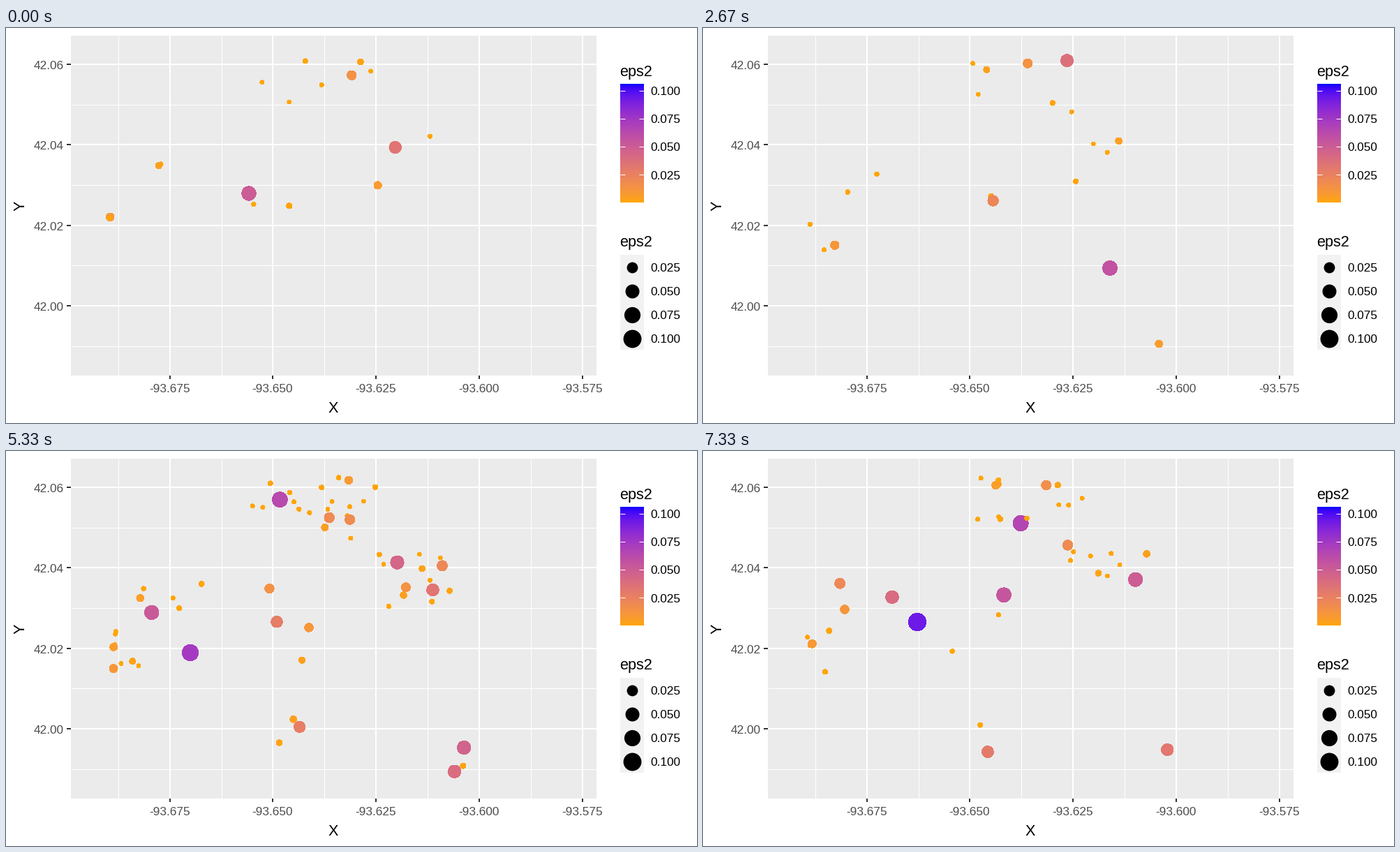
Animation of 990x566 px, one loop 8000 ms. Source, as a matplotlib script:

```python
import numpy as np
import matplotlib.pyplot as plt
from matplotlib.animation import FuncAnimation
from matplotlib.patches import Rectangle

W, H, DPI = 990, 566, 100
PX = 72 / DPI                      # one pixel in points
LOOP, TICK, SCENES = 8000, 40, 12
LEFT, RIGHT, TOP, BOTTOM = 92.5, 846, 10.5, 498
X0, DX, Y0, DY = 234.7, 147.75, 51.9, 115.4
EPS_MIN, EPS_MAX = 0.0004, 0.1059
R_MIN, R_SPAN = 2.94, 10.3

# Neighbourhoods: centre x, centre y, half width, half height, share of dots
AREAS = np.array([
    (163, 286, 27, 32, 13), (235, 208, 48, 28, 10), (415, 73, 62, 38, 24),
    (515, 85, 32, 50, 13), (582, 185, 62, 42, 22), (395, 255, 45, 60, 9),
    (405, 400, 20, 32, 3), (650, 444, 24, 19, 6),
])
# Key scenes: number of dots and place of the largest one
KEY = [0, 2, 4, 6, 8, 10, 11]
DOTS = [17, 27, 20, 39, 60, 90, 40]
LEAD_X = [348, 533, 583, 416, 264, 557, 307]
LEAD_Y = [237, 212, 344, 272, 289, 211, 245]

TO_XYZ = np.array([(0.4124, 0.3576, 0.1805), (0.2126, 0.7152, 0.0722),
                   (0.0193, 0.1192, 0.9505)])
WHITE = TO_XYZ.sum(axis=1)


def to_lab(rgb):
    rgb = np.array(rgb, float)
    lin = np.where(rgb > 0.04045, ((rgb + 0.055) / 1.055) ** 2.4, rgb / 12.92)
    v = TO_XYZ @ lin / WHITE
    x, y, z = np.where(v > 0.008856, np.cbrt(v), 7.787 * v + 16 / 116)
    return np.array([116 * y - 16, 500 * (x - y), 200 * (y - z)])


def to_rgb(lab):
    y = (lab[..., 0] + 16) / 116
    f = np.stack([y + lab[..., 1] / 500, y, y - lab[..., 2] / 200], axis=-1)
    xyz = np.where(f > 0.2069, f ** 3, (f - 16 / 116) / 7.787) * WHITE
    lin = np.clip(xyz @ np.linalg.inv(TO_XYZ).T, 0, 1)
    rgb = np.where(lin > 0.0031308, 1.055 * lin ** (1 / 2.4) - 0.055, 12.92 * lin)
    return np.clip(rgb, 0, 1)


LOW, HIGH = to_lab((1, 165 / 255, 0)), to_lab((0, 0, 1))


def shade(t):
    return to_rgb(LOW + (HIGH - LOW) * np.asarray(t, float)[..., None])


def dot_area(t):
    r = R_MIN + R_SPAN * np.sqrt(t)
    return (2 * r * PX) ** 2


def scene(k):
    """Positions and relative eps of the dots in scene k."""
    rng = np.random.default_rng(40 + k)
    n = int(np.interp(k, KEY, DOTS))

    def spread():
        return rng.permutation((np.arange(n) + rng.random(n)) / n)

    share = np.cumsum(AREAS[:, 4]) / AREAS[:, 4].sum()
    spot = AREAS[np.searchsorted(share, spread())]
    xy = spot[:, :2] + spot[:, 2:4] * rng.uniform(-1, 1, (n, 2))
    peak = 0.48 + 0.4 * (k / (SCENES - 1)) ** 2
    t = peak * spread() ** 7
    top = t.argmax()
    xy[top] = np.interp(k, KEY, LEAD_X), np.interp(k, KEY, LEAD_Y)
    t[top] = peak
    return xy, t


plt.rcParams["font.family"] = "Liberation Sans"
fig = plt.figure(figsize=(W / DPI, H / DPI), dpi=DPI, facecolor="white")
ax = fig.add_axes([0, 0, 1, 1])
ax.axis("off")


def box(x0, y0, x1, y1, color):
    ax.add_patch(Rectangle((x0, y0), x1 - x0, y1 - y0, fc=color, lw=0))


def line(x0, y0, x1, y1, color, width):
    ax.plot([x0, x1], [y0, y1], color=color, lw=width * PX,
            solid_capstyle="butt", zorder=2)


def label(x, y, text, size=17.2, color="black", ha="center"):
    ax.text(x, y, text, fontsize=size * PX, color=color, ha=ha,
            va="center_baseline")


# Panel, grid and axes
box(LEFT, TOP, RIGHT, BOTTOM, "#EBEBEB")
for i in range(5):
    x = X0 + DX * (i - 0.5)
    line(x, TOP, x, BOTTOM, "white", 1)
for i in range(4):
    y = Y0 + DY * (i + 0.5)
    line(LEFT, y, RIGHT, y, "white", 1)
for i in range(5):
    x = X0 + DX * i
    line(x, TOP, x, BOTTOM, "white", 2)
    line(x, BOTTOM, x, BOTTOM + 5.4, "#333333", 2)
    label(x - 0.5, 516, f"{-93.675 + 0.025 * i:.3f}", color="#4D4D4D")
for i in range(4):
    y = Y0 + DY * i
    line(LEFT, y, RIGHT, y, "white", 2)
    line(LEFT - 5.4, y, LEFT, y, "#333333", 2)
    label(83, y + 1, f"{42.06 - 0.02 * i:.2f}", color="#4D4D4D", ha="right")
label(469, 543, "X", 21.7)
ax.text(20.5, 255, "Y", fontsize=21.7 * PX, rotation=90, ha="center", va="center")

# Colour legend
label(879.5, 60.5, "eps2", 21.7, ha="left")
ramp = shade(np.linspace(1, 0, 170))[:, None, :]
ax.imshow(ramp, extent=(880, 914, 250, 80), aspect="auto",
          interpolation="nearest", zorder=1)
for i in range(4):
    y = 89.5 + 40.2 * i
    line(880, y, 886.8, y, "white", 1)
    line(907.2, y, 914, y, "white", 1)
    label(923.5, y + 0.5, f"{0.1 - 0.025 * i:.3f}", ha="left")

# Size legend
label(879.5, 305.5, "eps2", 21.7, ha="left")
box(880, 325, 914, 461, "#F2F2F2")
for i in range(4):
    y, eps = 342.5 + 34 * i, 0.025 * (i + 1)
    t = (eps - EPS_MIN) / (EPS_MAX - EPS_MIN)
    ax.scatter([897], [y], s=dot_area(t), c="black", lw=0,
               antialiased=False, zorder=3)
    label(923.5, y + 0.5, f"{eps:.3f}", ha="left")

ax.set(xlim=(0, W), ylim=(H, 0))
points = ax.scatter([], [], lw=0, antialiased=False, zorder=4)


def draw(i):
    # Switch on the tick just before each scene is due
    k = int((i * TICK + 30) * SCENES / LOOP)
    xy, t = scene(k)
    points.set_offsets(xy)
    points.set_sizes(dot_area(t))
    points.set_facecolor(shade(t))
    return (points,)


anim = FuncAnimation(fig, draw, frames=LOOP // TICK, interval=TICK,
                     repeat=True, repeat_delay=0)
plt.show()
```
